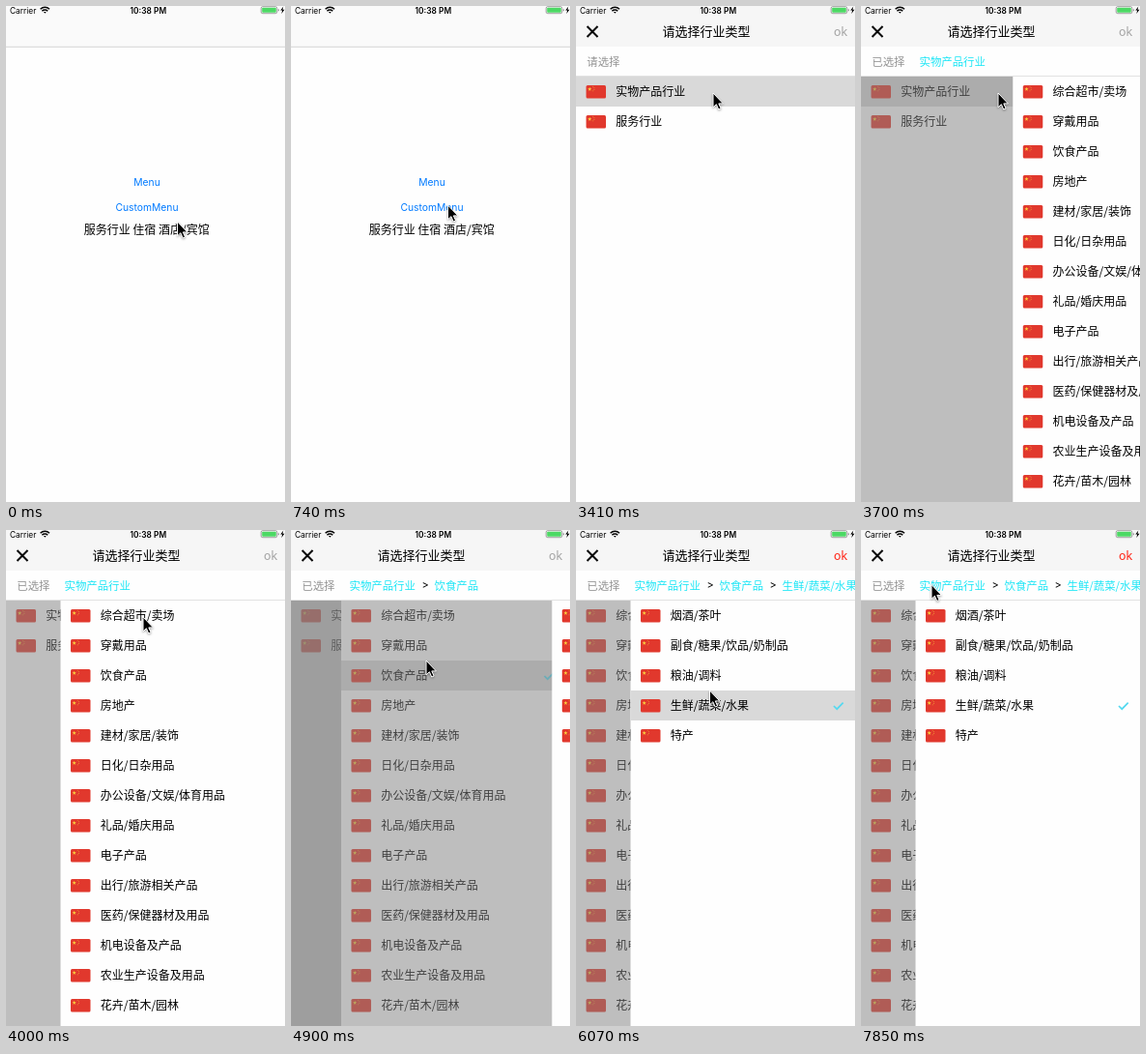
An HTML page that plays this animation: 289x513 px, repeating every 8 s.

```html
<!DOCTYPE html>
<html lang="zh-CN">
<head>
<meta charset="utf-8">
<title>行业类型</title>
<style>
  html, body { margin: 0; width: 100%; height: 100%; overflow: hidden; background: #fefefe; }
  svg { display: block; width: 100vw; height: 100vh; }
  text { font-family: "Noto Sans CJK SC", "Noto Sans CJK JP", "Noto Sans CJK", sans-serif; font-size: 12px; }
  .ui { font-family: Inter, Roboto, sans-serif; }
  .status { font-size: 8.4px; }
  .link { font-size: 10.3px; fill: #007aff; }
  .mid { text-anchor: middle; }
  .title { font-size: 13px; font-weight: 500; }
  .crumb { font-size: 11.4px; fill: #1ee6f6; }
  .label { font-size: 11.4px; fill: #959595; }
  .gt { font-size: 11px; }
  .ok { font-size: 12.5px; }
  .paper { fill: #fefefe; }
  .glow { fill: #d9d9d9; }
  .dim { fill: #808080; fill-opacity: .5; }
  .tick { fill: none; stroke: #55d9f0; stroke-width: 1.7; }
  #cursor { filter: drop-shadow(0 1px 1px rgba(0, 0, 0, .35)); }
</style>
</head>
<body>
<svg viewBox="0 0 289 513">
  <defs>
    <g id="flag">
      <rect width="20.5" height="13.5" rx="1.5" fill="#e1382d"/>
      <path d="M3.7 1.8l.5 1.5h1.6l-1.3 1 .5 1.5-1.3-.9-1.3.9.5-1.5-1.3-1h1.6z" fill="#fbd33c"/>
      <path d="M6.8 1.4h.8M8 2.7h.8M8 4.5h.8M6.8 5.8h.8" stroke="#f5b53a" stroke-width=".7"/>
    </g>
  </defs>

  <rect class="paper" width="289" height="513"/>
  <rect width="289" height="42" fill="#fafafa"/>
  <path d="M0 42.3H289" stroke="#c9c9c9" stroke-width=".8"/>
  <text class="ui link mid" x="146" y="185.5">Menu</text>
  <text class="ui link mid" x="146" y="212">CustomMenu</text>
  <text class="mid" x="145.7" y="236">服务行业 住宿 酒店/宾馆</text>

  <g id="modal">
    <rect class="paper" width="289" height="513"/>
    <g id="panels"></g>
    <rect width="289" height="42" fill="#f6f6f6"/>
    <path d="M11.5 21l11 11M22.5 21l-11 11" stroke="#000" stroke-width="2"/>
    <text class="title mid" x="135" y="31.3">请选择行业类型</text>
    <text id="ok" class="ui ok" x="267" y="31">ok</text>
    <path d="M0 72.5H289" stroke="#e2e2e2"/>
    <text id="label" class="label" x="11.3" y="61.7"></text>
    <g id="crumbs"></g>
  </g>

  <text class="ui status" x="4" y="7.6">Carrier</text>
  <g fill="none" stroke="#000" stroke-width="1.5">
    <path d="M35.6 3.2a6.6 6.6 0 0 1 9.4 0M37.4 5.2a4.1 4.1 0 0 1 5.8 0"/>
    <path d="M39 6.1h2.6l-1.3 1.6z" fill="#000" stroke="none"/>
  </g>
  <text class="ui status mid" x="147.3" y="7.6" font-weight="600">10:38 PM</text>
  <rect x="264.2" y=".7" width="16.6" height="7" rx="1.6" fill="#fff" stroke="#777" stroke-width=".7"/>
  <rect x="265.2" y="1.7" width="14.6" height="5" rx=".8" fill="#4cd964"/>
  <path d="M281.8 3v2.6q1-.3 1-1.3t-1-1.3z" fill="#777"/>
  <path d="M287.3.4l-3 4.2h1.9l-.9 3.4 3.2-4.3h-2z"/>

  <g id="cursor">
    <path d="M0 0V14.8L3.4 11.7L5.7 17L8.1 16L5.8 10.9H10.4Z" stroke="#fff" stroke-width="1"/>
  </g>
</svg>

<script>
const LOOP = 8000, BEAT = LOOP / 54;   // the screen refreshes once per beat
const TOP = 73, ROW = 31, EDGE = 56.5, WIDTH = 289;
const $ = id => document.getElementById(id);

// picked row, beat of touch, beat of selection, beat when the highlight is gone
const panels = [
  { row: 0, touch: 23, pick: 24, gone: 27, width: WIDTH,
    items: '实物产品行业 服务行业' },
  { row: 2, touch: 32, pick: 33, gone: 36, width: WIDTH - EDGE,
    items: '综合超市/卖场 穿戴用品 饮食产品 房地产 建材/家居/装饰 日化/日杂用品 办公设备/文娱/体育用品 ' +
           '礼品/婚庆用品 电子产品 出行/旅游相关产品 医药/保健器材及用品 机电设备及产品 ' +
           '农业生产设备及用品 花卉/苗木/园林' },
  { row: 3, touch: 40, pick: 41, gone: 43, width: WIDTH - EDGE,
    items: '烟酒/茶叶 副食/糖果/饮品/奶制品 粮油/调料 生鲜/蔬菜/水果 特产' }
];
const crumbX = [60.5, 148.5, 213.5];

// beat, x, y
const path = [
  [0, 177.5, 223], [1, 188, 223], [2, 183, 220], [3, 172, 212], [4, 165, 208], [5, 162.5, 206],
  [15, 162.5, 206], [17, 159, 185], [19, 147, 120], [21, 142, 90],
  [29, 142, 90], [31, 140, 135],
  [38, 140, 135], [39, 138.5, 166],
  [42, 138.5, 166], [43, 141, 163], [46, 165, 95], [48, 188, 46], [49, 192, 41], [50, 192, 57],
  [51, 61, 57.5], [52, 61, 57.5], [53, 73, 56.5]
];

const clamp = v => Math.min(1, Math.max(0, v));
const mix = (a, b, p) => a + (b - a) * p;
const slide = (beat, pick) => {
  const u = clamp((beat - pick + .47) / 2.7);
  return u * u * (3 - 2 * u);
};
const move = (id, x, y) => $(id).setAttribute('transform', `translate(${x} ${y})`);
const show = (id, on) => $(id).setAttribute('opacity', +on);

function rowMarkup(name, i) {
  const y = TOP + ROW * i;
  return `<use href="#flag" x="10.5" y="${y + 9}"/><text x="41.2" y="${y + 20}">${name}</text>`;
}

function panelMarkup(p, i) {
  const y = TOP + ROW * p.row;
  const dim = i ? `<rect id="dim${i}" class="dim" y="${TOP}" width="${WIDTH}" height="440"/>` : '';
  return `${dim}<g id="panel${i}">
    <rect class="paper" y="${TOP}" width="${WIDTH}" height="440"/>
    <rect id="glow${i}" class="glow" y="${y}" width="${p.width}" height="${ROW}"/>
    ${p.items.split(' ').map(rowMarkup).join('')}
    <path id="tick${i}" class="tick" d="M${p.width - 22} ${y + 16}l3.3 3.2 6.4-6.6"/>
  </g>`;
}

function crumbMarkup(p, i) {
  const gt = i ? `<text class="ui gt" x="${crumbX[i] - 13}" y="61.4">&gt;</text>` : '';
  return `<g id="crumb${i}">${gt}<text class="crumb" x="${crumbX[i]}" y="61.7">${p.items.split(' ')[p.row]}</text></g>`;
}

$('panels').innerHTML = panels.map(panelMarkup).join('');
$('crumbs').innerHTML = panels.map(crumbMarkup).join('');

function moveCursor(beat) {
  const n = path.findIndex(p => p[0] > beat);
  const b = n < 0 ? path[path.length - 1] : path[n];
  const a = n < 0 ? b : path[n - 1];
  const p = a === b ? 0 : (beat - a[0]) / (b[0] - a[0]);
  move('cursor', mix(a[1], b[1], p), mix(a[2], b[2], p));
}

function pose(beat) {
  moveCursor(beat);
  move('modal', 0, 513 * (1 - clamp((beat - 9.5) / 3.5)) ** 4.5);

  const first = slide(beat, panels[0].pick), second = slide(beat, panels[1].pick);
  move('panel1', mix(mix(WIDTH, EDGE, first), 0, second), 0);
  move('panel2', mix(WIDTH, EDGE, second), 0);

  panels.forEach((p, i) => {
    const picked = beat >= p.pick;
    $('glow' + i).setAttribute('opacity', beat < p.touch ? 0 : i < 2 ? clamp((p.gone - beat) / 2) : +(beat < p.gone));
    show('tick' + i, picked);
    show('crumb' + i, picked);
    if (i) show('dim' + i, beat >= panels[i - 1].pick);
  });
  $('label').textContent = beat < panels[0].pick ? '请选择' : '已选择';
  $('ok').setAttribute('fill', beat < panels[2].pick ? '#a6a6a6' : '#ff2a1c');
}

const start = performance.now();
let last = -1;
function tick() {
  const t = (performance.now() - start) % LOOP;
  const beat = Math.floor((t + 8.2) / BEAT);
  if (beat !== last) pose(last = beat);
  requestAnimationFrame(tick);
}
tick();
</script>
</body>
</html>
```
